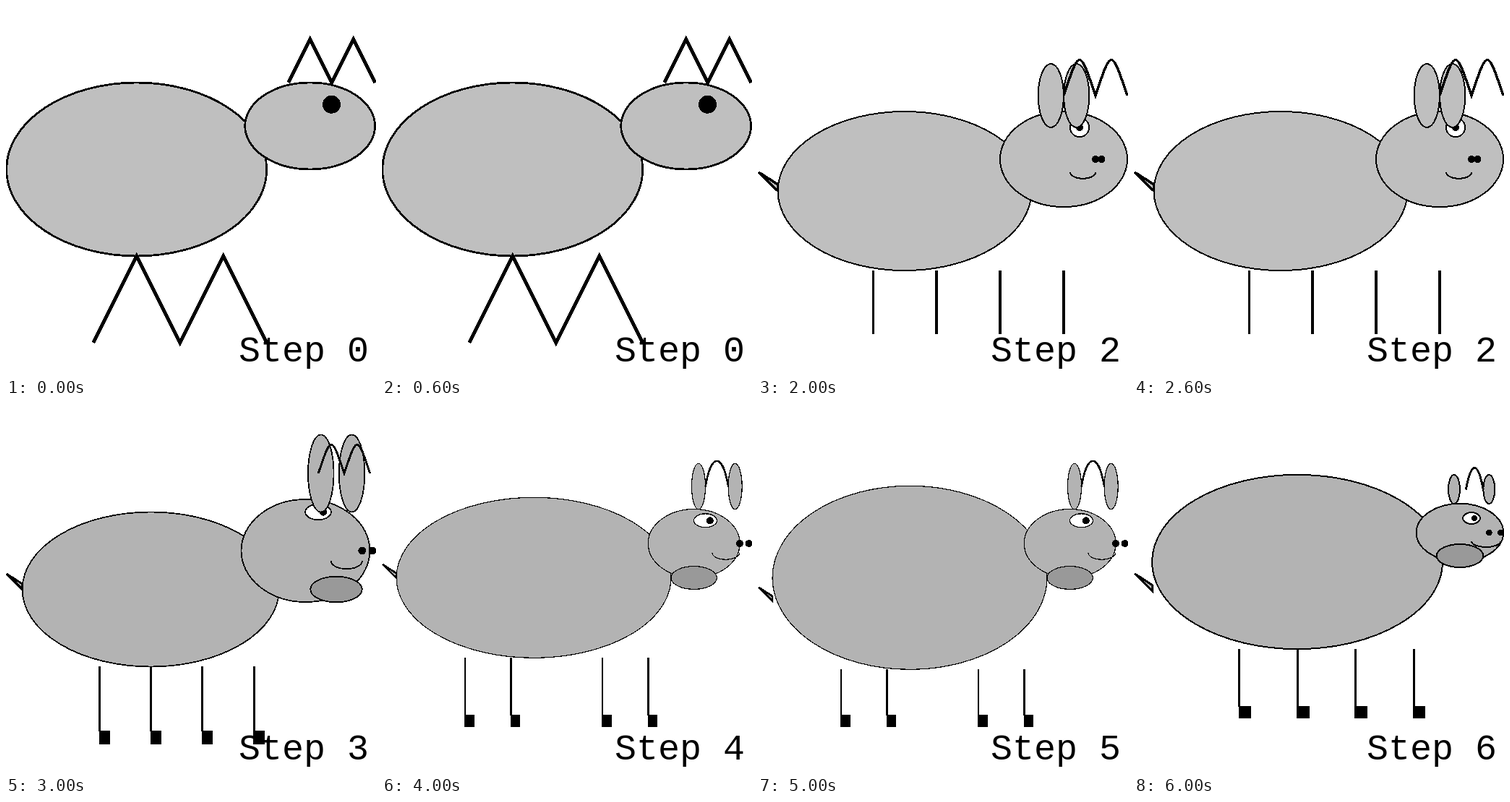
Recreate the animation shown at these times as an HTML page. Size 512x512 px, loop 7000 ms.

```html
<!DOCTYPE html>
<html>
<head>
<meta charset="utf-8">
<style>
html, body { margin: 0; width: 100%; height: 100%; overflow: hidden; background: #fff; }
svg { display: block; width: 100vw; height: 100vh; }
text { font: 50px "Liberation Mono", monospace; white-space: pre; }
</style>
</head>
<body>
<svg id="stage" viewBox="0 0 512 512"></svg>
<script>
const STEP_MS = 1000;

// Ellipses are [cx, cy, rx, ry]; ears [x1, x2, cy, rx, ry]; eye ends with pupil x and radius;
// nose [x1, x2, r]; mouth [x, y, rx, ry]; horns [x, y, halfWidth, height, count, roundness];
// legs list the top x positions, span their top and bottom y; tail [x, y, tipX, tipY, upperY].
const blob = {
  fill: "#bfbfbf", thin: 2.8, thick: 4.8,
  body: [180.7, 226, 180, 120], head: [420.7, 166, 90, 60], dot: [450.5, 136.2, 12.5],
  zigzags: ["390.6,106 420.6,46 450.6,106 480.6,46 510.6,106",
    "120.6,466 180.6,346 240.6,466 300.6,346 360.6,466"]
};
const eared = {
  fill: "#bfbfbf", thin: 2.4, thick: 4,
  body: [203, 242, 168, 112], head: [427, 186, 84, 56],
  eye: [455, 158, 16.8, 16.8, 455, 5.6], ears: [404.4, 449.2, 130, 22.4, 44.8],
  nose: [482.5, 494, 5.8], horns: [399, 130, 28, 63, 2, 0],
  legs: [169, 236.5, 315, 382], span: [354, 466], lean: [-33, -33, 33, 33],
  tail: [35, 242, 1.4, 186, 219.6]
};
const smiling = {
  fill: "#bfbfbf", thin: 2, thick: 3.5,
  body: [203, 256, 175.5, 110], head: [423, 212, 88, 66],
  eye: [445, 168, 13.2, 13.2, 445, 5], ears: [405.3, 440.7, 124, 17.6, 44],
  nose: [467, 475.5, 5], mouth: [432, 230, 17.6, 8.8], horns: [423, 124, 22, 49.5, 2, 0],
  legs: [159.5, 247, 335, 423], span: [365.5, 454],
  tail: [27.5, 256, 1, 230, 247]
};
const hoofed = {
  fill: "#b3b3b3", thin: 1.8, thick: 2.9,
  body: [200.3, 256.5, 177.7, 107], head: [414.5, 203, 89, 71],
  eye: [432, 149.5, 17.8, 10.7, 439.2, 5.2], ears: [435.8, 478.6, 96, 17.8, 53.5],
  nose: [492.8, 507, 5.4], mouth: [450, 217.5, 21.4, 10.7],
  jaw: [457, 256.5, 35.7, 17.8], horns: [432.2, 96, 17.9, 40, 2, 0],
  legs: [129.5, 200.5, 271.7, 343.3], span: [363, 452.5], hoof: [13.8, 17.5],
  tail: [22.5, 256.5, 1, 235, 249]
};
const slim = {
  fill: "#b3b3b3", thin: 1.2, thick: 2.6,
  body: [210, 240.3, 190, 111], head: [431.7, 193, 63.4, 47.5],
  eye: [447.5, 161.3, 15.9, 9.5, 453.8, 5], ears: [438, 488.7, 114, 9.5, 31.7],
  nose: [495, 507.7, 5], mouth: [456.8, 205.7, 19, 9.5],
  jaw: [431.7, 240.5, 31.7, 15.9], horns: [447.5, 114.5, 15.9, 35.7, 1, .5],
  legs: [115, 178.5, 305, 368.4], span: [351.3, 431], hoof: [12, 15],
  tail: [20, 240.8, 1, 222, 234.3]
};
const round = {
  ...slim,
  body: [210, 240.3, 190, 127], span: [367.2, 431],
  tail: [20, 272.5, 1, 253.5, 266]
};
const plump = {
  fill: "#b3b3b3", thin: 2, thick: 3,
  body: [226, 218.5, 201, 120.6], head: [451, 178, 60.3, 40.2],
  eye: [467, 158, 12, 8, 471, 4.2], ears: [443, 491.3, 118, 8, 20],
  nose: [491.3, 507.4, 4.4], mouth: [467, 190, 20.1, 8],
  jaw: [451, 210, 32.2, 16], horns: [459.3, 118.5, 12, 30, 1, .4],
  legs: [145.7, 226.3, 306.4, 387], span: [338.7, 419], hoof: [15.3, 15.3],
  tail: [25.4, 258.7, 1, 234.7, 250.7]
};
const steps = [blob, eared, smiling, hoofed, slim, round, plump];

function drawing(a, number) {
  const ellipse = ([cx, cy, rx, ry], fill = a.fill) =>
    `<ellipse cx="${cx}" cy="${cy}" rx="${rx}" ry="${ry}" fill="${fill}" stroke="#000" stroke-width="${a.thin}"/>`;
  const dot = (x, y, r) => `<circle cx="${x}" cy="${y}" r="${r}"/>`;
  const line = (d, width = a.thick, fill = "none") =>
    `<path d="${d}" fill="${fill}" stroke="#000" stroke-width="${width}"/>`;
  let out = "";

  if (a.tail) {
    const [x, y, tipX, tipY, upperY] = a.tail;
    out += line(`M${x} ${y}L${tipX} ${tipY}L${x} ${upperY}Z`, a.thick, a.fill);
  }
  out += ellipse(a.body) + ellipse(a.head);
  if (a.eye) {
    const [, y, , , pupilX, r] = a.eye;
    out += ellipse(a.eye, "#fff") + dot(pupilX, y, r);
  }
  if (a.ears) {
    const [left, right, ...rest] = a.ears;
    out += ellipse([left, ...rest]) + ellipse([right, ...rest]);
  }
  if (a.jaw) out += ellipse(a.jaw, "#999");
  if (a.nose) {
    const [left, right, r] = a.nose;
    out += dot(left, a.head[1], r) + dot(right, a.head[1], r);
  }
  if (a.mouth) {
    const [x, y, rx, ry] = a.mouth;
    out += line(`M${x} ${y}a${rx} ${ry} 0 0 0 ${2 * rx} 0`, a.thin);
  }
  if (a.horns) {
    const [x, y, w, h, count, roundness] = a.horns;
    const top = -h / .75;
    const arch = `c${w * (1 - roundness)} ${top} ${w * (1 + roundness)} ${top} ${2 * w} 0`;
    out += line(`M${x} ${y}` + arch.repeat(count));
  }
  if (a.legs) {
    const [top, bottom] = a.span;
    a.legs.forEach((x, i) => {
      out += line(`M${x} ${top}L${x + (a.lean ? a.lean[i] : 0)} ${bottom}`);
      if (a.hoof) out += line(`M${x} ${bottom}h${a.hoof[0]}v${a.hoof[1]}h${-a.hoof[0]}z`, a.thin, "#000");
    });
  }
  if (a.dot) out += dot(...a.dot);
  for (const points of a.zigzags || []) out += line("M" + points);

  return `<g shape-rendering="crispEdges">${out}</g><text x="322" y="492">Step ${number}</text>`;
}

const stage = document.getElementById("stage");
let shown = -1;
function tick() {
  const i = Math.floor(performance.now() / STEP_MS) % steps.length;
  if (i !== shown) stage.innerHTML = drawing(steps[i], shown = i);
  requestAnimationFrame(tick);
}
tick();
</script>
</body>
</html>
```
